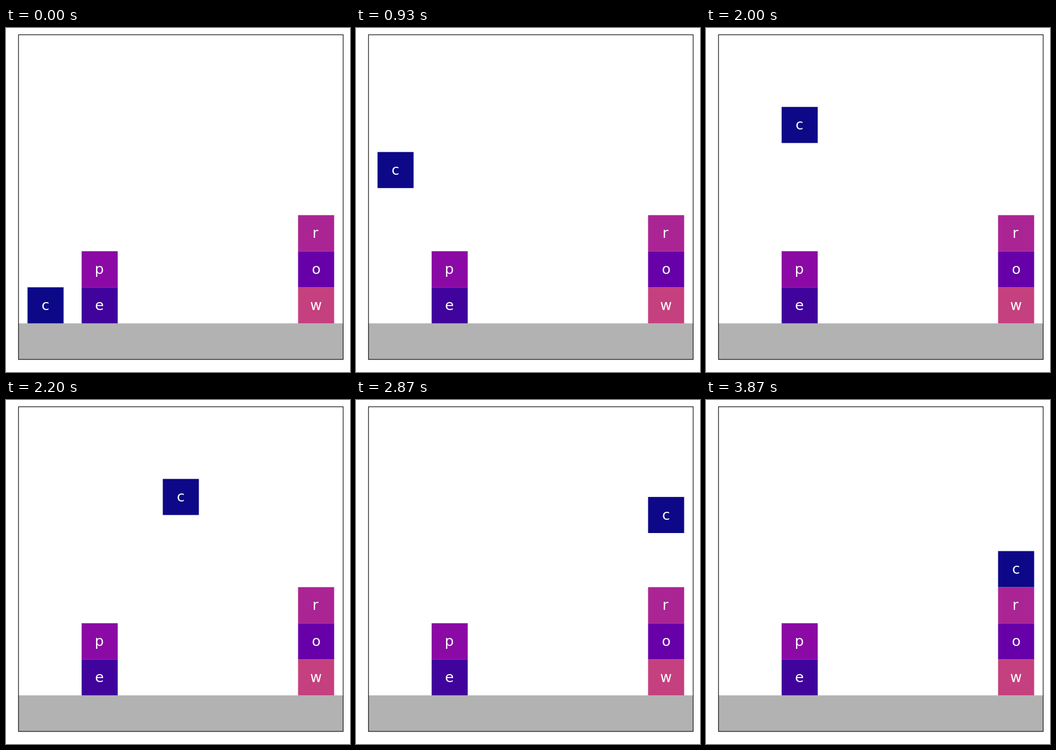
Write an HTML page with a canvas that moves like this. It is 600x600 px and loops after 3.94 s.

```html
<!DOCTYPE html>
<html>
<head>
<meta charset="utf-8">
<style>
  html, body { margin: 0; overflow: hidden; background: #fff; }
  canvas { display: block; }
</style>
</head>
<body>
<canvas width="600" height="600"></canvas>
<script>
const ctx = document.querySelector('canvas').getContext('2d');
const LOOP = 3940, UNIT = 62.92, LEFT = 21.8, BOTTOM = 578.09;
const clamp = (v, lo, hi) => Math.max(lo, Math.min(hi, v));

// Column and row are in block units, measured from the lower left corner.
function block(letter, color, column, row) {
  const x = LEFT + column * UNIT, y = BOTTOM - (row + 1) * UNIT;
  ctx.fillStyle = color;
  ctx.fillRect(x, y, UNIT, UNIT);
  ctx.fillStyle = '#fff';
  const ink = ctx.measureText(letter);
  const shift = (ink.actualBoundingBoxRight - ink.actualBoundingBoxLeft) / 2;
  ctx.fillText(letter, x + UNIT / 2 - shift, y + UNIT / 2 + 8);
}

// 15 steps per second, on times rounded to 10 ms.
function stepAt(time) {
  const rest = time % 200;
  return Math.min(58, Math.floor(time / 200) * 3 + (rest >= 70) + (rest >= 130));
}

function draw(step) {
  const lift = step < 1 ? 0 : Math.min(5, (step + 1) / 4);
  const slide = step < 30 ? 0 : Math.min(1, (step - 28) / 10);
  const drop = clamp((step - 38) / 10, 0, 2);

  ctx.fillStyle = '#fff';
  ctx.fillRect(0, 0, 600, 600);
  ctx.fillStyle = '#b2b2b2';
  ctx.fillRect(LEFT, BOTTOM - UNIT, 9 * UNIT, UNIT);

  ctx.font = '25px "DejaVu Sans", sans-serif';
  block('e', '#40049c', 1.75, 1);
  block('p', '#8b0aa5', 1.75, 2);
  block('w', '#c5407e', 7.75, 1);
  block('o', '#6700a8', 7.75, 2);
  block('r', '#ab2494', 7.75, 3);
  block('c', '#0d0887', 0.25 + 7.5 * slide, 1 + lift - drop);

  ctx.strokeStyle = '#000';
  ctx.lineWidth = 1.11;
  ctx.strokeRect(LEFT, BOTTOM - 9 * UNIT, 9 * UNIT, 9 * UNIT);
}

function tick() {
  draw(stepAt(performance.now() % LOOP));
  requestAnimationFrame(tick);
}
tick();
</script>
</body>
</html>
```
